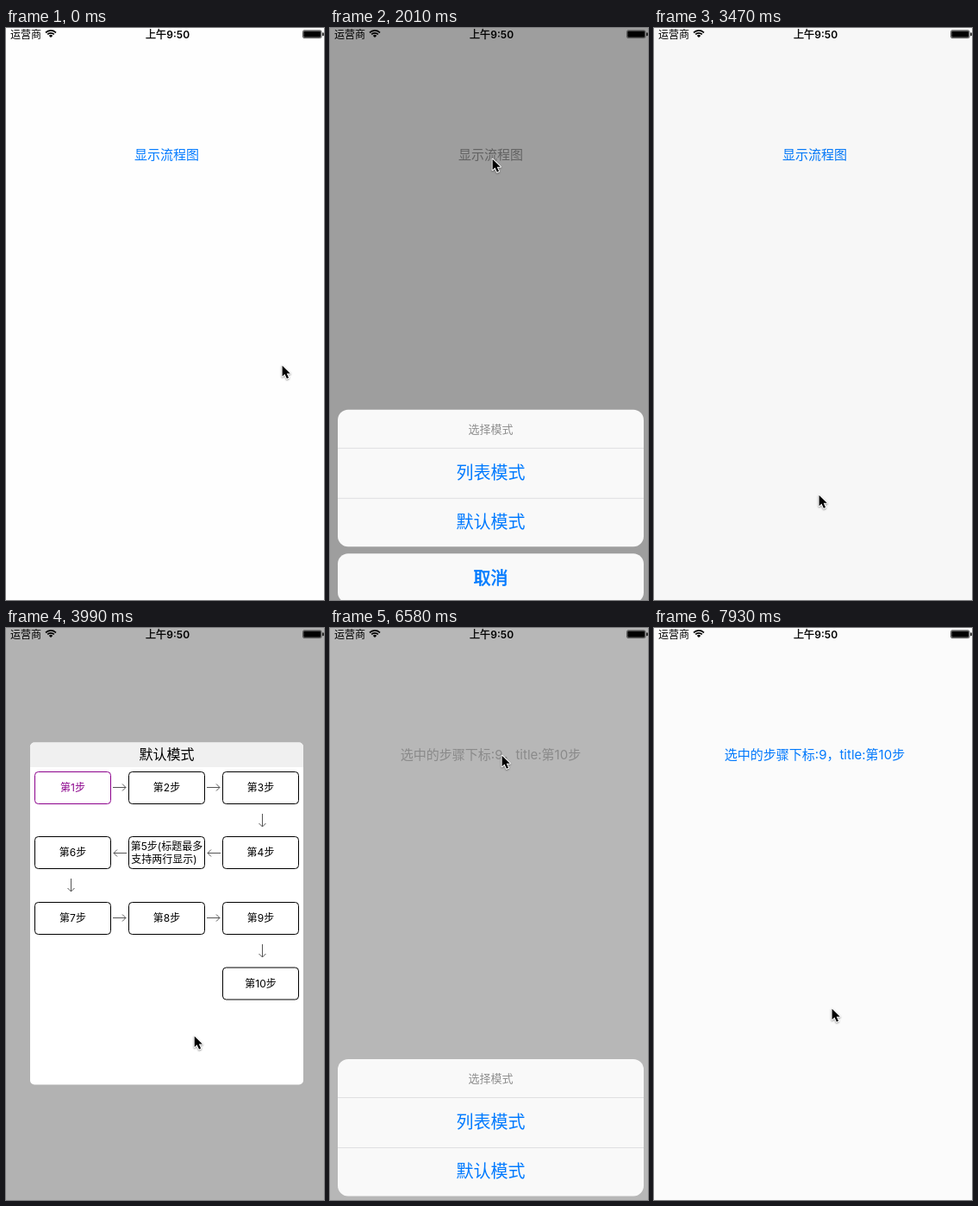
These frames come from a looping animation (369x662 px, 7990 ms). An HTML page with a canvas:

```html
<!DOCTYPE html>
<html lang="zh-CN">
<head>
<meta charset="utf-8">
<style>
html, body { margin: 0; width: 100%; height: 100%; overflow: hidden; background: #fefefe; }
canvas { display: block; width: 369px; height: 662px; }
</style>
</head>
<body>
<canvas id="stage"></canvas>
<script>
const W = 369, H = 662, LOOP = 7990;
const canvas = document.getElementById('stage');
const ctx = canvas.getContext('2d');
const dpr = window.devicePixelRatio || 1;
canvas.width = W * dpr;
canvas.height = H * dpr;

const FONT = 'Inter, "Noto Sans CJK SC", "Noto Sans CJK", "Noto Sans CJK JP", sans-serif';
const BLUE = '#007aff';
const FIRST_TAP = 1685, SECOND_TAP = 6412;
const clamp = v => Math.max(0, Math.min(1, v));
const ramp = (t, start, length) => clamp((t - start) / length);

// Pointer path: time, x, y
const path = [
  [0, 320, 390], [500, 320, 390], [1100, 188, 151], [2450, 188, 151],
  [2720, 208, 335], [2960, 191, 540], [3730, 191, 540], [3990, 218, 472],
  [4560, 287, 339], [4620, 287, 339], [4790, 290, 414], [5600, 290, 414],
  [5860, 260, 298], [6230, 199, 147], [6720, 199, 147], [7200, 180, 505],
  [7260, 181, 506], [7470, 181, 506], [7930, 206, 440], [7990, 206, 440]
];

// Monotone cubic interpolation: rests at holds, flows through waypoints
function along(t, k) {
  const rate = i => path[i + 1]
    ? (path[i + 1][k] - path[i][k]) / (path[i + 1][0] - path[i][0]) : 0;
  const slope = i => {
    if (!i) return 0;
    const a = rate(i - 1), b = rate(i);
    return a * b > 0 ? 2 * a * b / (a + b) : 0;
  };
  let i = 0;
  while (i < path.length - 2 && path[i + 1][0] <= t) i++;
  const d = path[i + 1][0] - path[i][0], u = (t - path[i][0]) / d, v = 1 - u;
  return path[i][k] * v * v * (1 + 2 * u) + path[i + 1][k] * u * u * (3 - 2 * u)
    + d * u * v * (v * slope(i) - u * slope(i + 1));
}

// "heavy" thickens the glyphs by a thin outline, for a medium weight
function text(str, x, y, size, color, { weight = 400, heavy = 0, align = 'center' } = {}) {
  ctx.font = `${weight} ${size}px ${FONT}`;
  ctx.textAlign = align;
  ctx.textBaseline = 'alphabetic';
  ctx.fillStyle = ctx.strokeStyle = color;
  ctx.fillText(str, x, y + size * 0.37);
  if (heavy) {
    ctx.lineWidth = heavy;
    ctx.strokeText(str, x, y + size * 0.37);
  }
}

function panel(x, y, w, h, r, fill, stroke) {
  ctx.beginPath();
  ctx.roundRect(x, y, w, h, r);
  if (fill) { ctx.fillStyle = fill; ctx.fill(); }
  if (stroke) { ctx.strokeStyle = stroke; ctx.lineWidth = 1; ctx.stroke(); }
}

function statusBar() {
  text('运营商', 5, 7.4, 12, '#000', { align: 'left' });
  text('上午', 162, 7.4, 12, '#000', { heavy: 0.35, align: 'left' });
  text('9:50', 186.3, 7.4, 12, '#000', { weight: 600, align: 'left' });
  ctx.strokeStyle = '#000';
  ctx.lineWidth = 1.7;
  for (const r of [8.2, 5.2]) {
    ctx.beginPath();
    ctx.arc(52, 11, r, -Math.PI * 0.76, -Math.PI * 0.24);
    ctx.stroke();
  }
  ctx.beginPath();
  ctx.moveTo(52, 11);
  ctx.arc(52, 11, 3, -Math.PI * 0.76, -Math.PI * 0.24);
  ctx.fill();
  panel(344.5, 2.8, 21.5, 8.8, 1.5, null, '#555');
  panel(345.3, 3.6, 20, 7.2, 0.8, '#000');
  panel(367.2, 5.3, 1.5, 4, 0.7, '#000');
}

function actionSheet(shown) {
  const y = 430 + 232 * (1 - shown);
  panel(9, y, 355, 158.5, 12, '#f9f9f9');
  panel(9, y + 166.5, 355, 57, 12, '#f9f9f9');
  ctx.fillStyle = '#dfdfe1';
  ctx.fillRect(9, y + 44, 355, 1);
  ctx.fillRect(9, y + 102, 355, 1);
  text('选择模式', 186.5, y + 22, 13, '#8f8f8f');
  text('列表模式', 186.5, y + 73, 20, BLUE);
  text('默认模式', 186.5, y + 130, 20, BLUE);
  text('取消', 186.5, y + 194.5, 20, BLUE, { heavy: 0.6 });
}

function arrow(x, y, angle) {
  ctx.save();
  ctx.translate(x, y);
  ctx.rotate(angle);
  ctx.strokeStyle = '#555';
  ctx.lineWidth = 1;
  ctx.beginPath();
  ctx.moveTo(-7.5, 0);
  ctx.lineTo(7.5, 0);
  ctx.moveTo(3.5, -4);
  ctx.lineTo(7.5, 0);
  ctx.lineTo(3.5, 4);
  ctx.stroke();
  ctx.restore();
}

function flowCard() {
  panel(28, 132.5, 317, 396, 5, '#fff');
  panel(28, 132.5, 317, 28.5, [5, 5, 0, 0], '#f0f0f0');
  text('默认模式', 186.5, 146.5, 16, '#000');
  const columns = [33.5, 142.5, 251.5];
  for (let n = 1; n <= 10; n++) {
    // Rows snake; the tenth step sits below the ninth
    const row = Math.floor((n - 1) / 3), i = (n - 1) % 3;
    const x = columns[row % 2 ? 2 - i : i];
    const y = [166.5, 241.5, 317.5, 393][row];
    const color = n === 1 ? '#8b008b' : '#000';
    panel(x, y, 88, 37, 4, null, color);
    if (n === 5) {
      text('第5步(标题最多', x + 44, y + 11, 12, color);
      text('支持两行显示)', x + 41, y + 26, 12, color);
    } else {
      text(`第${n}步`, x + 44, y + 18.5, 12, color);
    }
    if (n === 10) continue;
    if (i === 2) arrow(row % 2 ? 75.5 : 297.5, y + 56, Math.PI / 2);
    else if (row % 2) arrow(x - 10, y + 19, Math.PI);
    else arrow(x + 98, y + 18, 0);
  }
}

function pointer(x, y) {
  ctx.save();
  ctx.translate(x, y);
  const shape = new Path2D('M.6.8V13.2L3.5 10.6 5.9 15.8 8 14.8 5.7 9.8H9.8Z');
  ctx.shadowColor = 'rgba(0,0,0,.4)';
  ctx.shadowBlur = 2 * dpr;
  ctx.shadowOffsetY = dpr;
  ctx.strokeStyle = '#fff';
  ctx.lineWidth = 2;
  ctx.lineJoin = 'round';
  ctx.stroke(shape);
  ctx.shadowColor = 'transparent';
  ctx.fillStyle = '#000';
  ctx.fill(shape);
  ctx.restore();
}

// Critically damped entry, quick exit
function sheetAmount(t, open, close) {
  if (t < open) return 0;
  const s = (t - open) * 0.0145;
  const left = 1 - ramp(t, close, 215);
  return (1 - (1 + s) * Math.exp(-s)) * left * left;
}

// A tapped or retitled button fades back to full strength
const recover = (t, start, length) => t < start ? 1 : 0.25 + 0.75 * ramp(t, start, length);

function draw(t) {
  ctx.setTransform(dpr, 0, 0, dpr, 0, 0);
  ctx.fillStyle = '#fefefe';
  ctx.fillRect(0, 0, W, H);

  const sheet = sheetAmount(t, FIRST_TAP, 3240) + sheetAmount(t, SECOND_TAP, 7470);
  const card = ramp(t, 3740, 220) * (1 - ramp(t, 5060, 260));
  const chosen = t >= 5330;

  const gray = clamp(sheet * 1.5);
  const mix = from => Math.round(from + (150 - from) * gray);
  ctx.globalAlpha = recover(t, FIRST_TAP, 360) * recover(t, 5330, 440) * recover(t, SECOND_TAP, 360);
  text(chosen ? '选中的步骤下标:9，title:第10步' : '显示流程图', 186.5, 146, 15,
    `rgb(${mix(0)},${mix(122)},${mix(255)})`);
  ctx.globalAlpha = 1;

  let rest = 0;
  if (t > 3240 && t < 3960) rest = 0.027;
  if (t > 7470) rest = 0.012;
  ctx.fillStyle = `rgba(0,0,0,${Math.max(0.4 * sheet, 0.3 * card, rest)})`;
  ctx.fillRect(0, 0, W, H);

  statusBar();
  if (sheet > 0) actionSheet(sheet);
  if (card > 0) {
    ctx.globalAlpha = card;
    flowCard();
    ctx.globalAlpha = 1;
  }
  pointer(along(t, 1), along(t, 2));
}

function tick() {
  draw(performance.now() % LOOP);
  requestAnimationFrame(tick);
}
tick();
</script>
</body>
</html>
```
